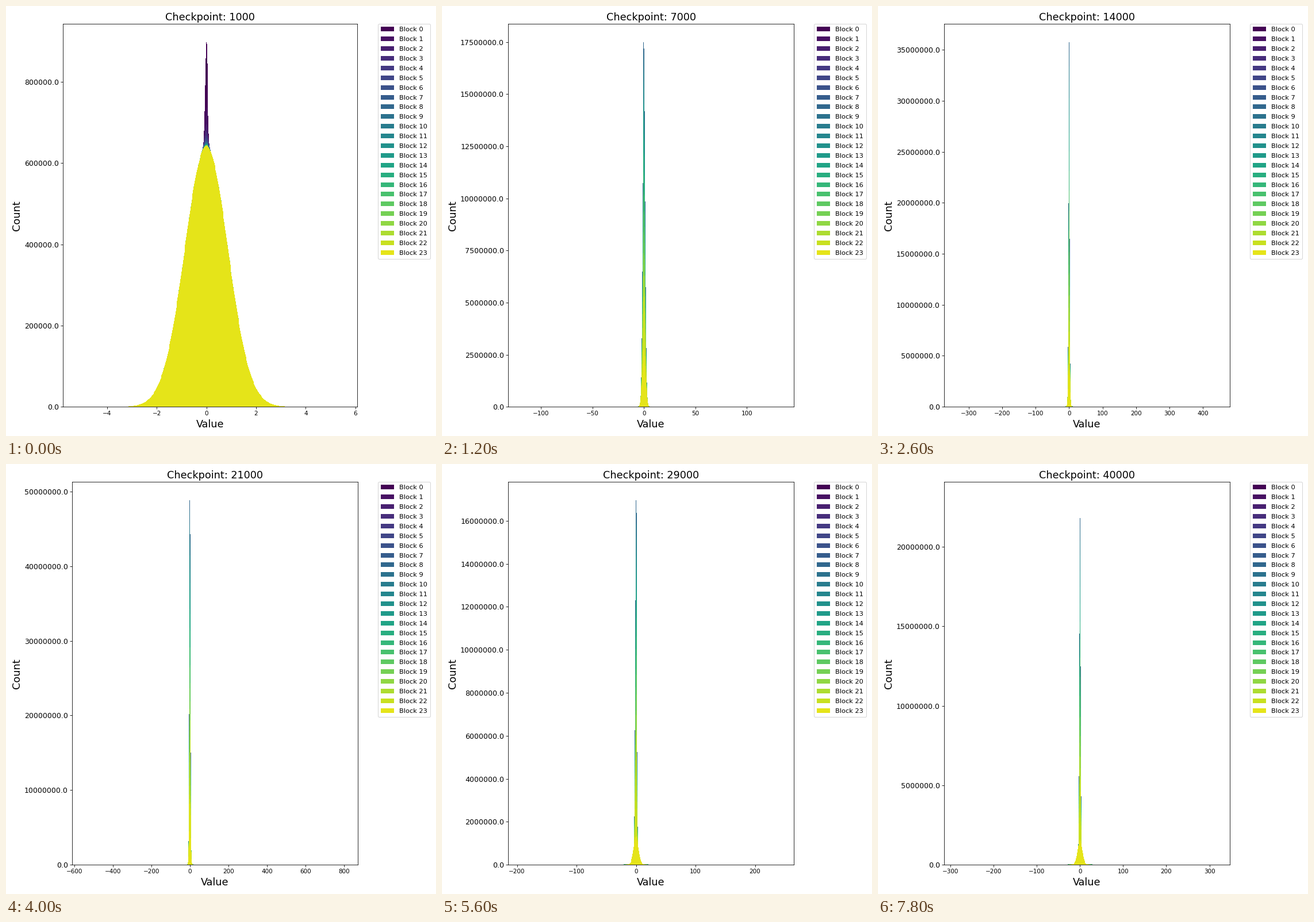
A matplotlib script for the animation above (8000 ms loop, 748 by 748 pixels).

```python
import numpy as np
import matplotlib.pyplot as plt
from matplotlib.animation import FuncAnimation
from matplotlib.patches import Patch

SIZE = 748
FRAMES, INTERVAL = 40, 200
BLOCKS, BINS = 24, 500
SETTLE = 6                    # steps until the early shape is gone
BOTTOM, TOP = 697.2, 31.2     # axes edges in pixels from the top

# key points of the axis range and the tallest bar
STEPS = [0, 6, 13, 20, 28, 33, 39]
X_MIN = [5.77, 131.8, 373.6, 611.3, 214.8, 230.2, 314.5]
X_MAX = [6.08, 145.5, 480.7, 871.3, 265.1, 266.3, 347.1]
TALLEST = [0.898e6, 17.495e6, 35.75e6, 48.83e6, 16.96e6, 17.52e6, 22.94e6]

block = np.arange(BLOCKS)
COLORS = plt.cm.viridis(block / BLOCKS)
HEIGHTS = 1 - 0.7 * np.clip((block - 8) / 14, 0, 1) ** 1.2


def between(i, values):
    """Value at step i: geometric growth at first, then linear."""
    if i < SETTLE:
        return np.exp(np.interp(i, STEPS, np.log(values)))
    return np.interp(i, STEPS, values)


def bell(x, sd):
    return np.exp(-0.5 * (x / sd) ** 2)


def histograms(i):
    left, right, top = (between(i, v) for v in (X_MIN, X_MAX, TALLEST))
    span = left + right
    width = span / 1.1 / BINS
    first = -np.round((left - span * 0.05 / 1.1) / width)
    edges = (first + 0.1 + np.arange(BINS + 1)) * width
    x = edges[:-1] + width / 2

    # spread follows the range; the last block keeps widening
    sd = 0.86 + 0.00125 * span
    last_sd = sd if i == 0 else 0.89 + 0.11 * i
    heights = HEIGHTS.copy()
    heights[-1] = 0.2 * sd / last_sd
    early = max(0, 1 - i / SETTLE)
    heights = early + (1 - early) * heights
    spreads = sd * heights ** -0.15
    spreads[-1] = last_sd

    # faint tails, shorter for the last blocks
    reach = (1 + 0.85 * i) * (1 - 0.4 * np.clip((block - 16) / 7, 0, 1))
    # narrow spike at zero, strongest in the first block
    spikes = 0.41 * early ** 3 / (1 + block) ** 1.4
    spike_sds = 0.05 * (1 + block) ** 0.3

    counts = np.array([
        h * bell(x, s) + k * bell(x, ks) + 0.0022 * np.exp(-(x / r) ** 2)
        for h, s, k, ks, r in zip(heights, spreads, spikes, spike_sds, reach)])
    return edges, counts * top / counts.max(), (-left, right), top * 1.05


fig = plt.figure(figsize=(10, 10), dpi=SIZE / 10)
ax = fig.add_axes([0.15, 0.07, 0.66, 0.89])
ax.set_xlabel("Value", fontsize=17)
ax.set_ylabel("Count", fontsize=17)
ax.tick_params(axis="y", labelsize=12)
ax.yaxis.set_major_formatter(lambda v, pos: f"{v:.1f}")
title = ax.set_title("", fontsize=17)

bars = [ax.stairs(np.zeros(BINS), np.arange(BINS + 1), fill=True,
                  color=c, antialiased=False) for c in COLORS]
ax.legend(handles=[Patch(color=c, linewidth=0, label=f"Block {b}")
                   for b, c in enumerate(COLORS)],
          loc="upper left", bbox_to_anchor=(1.07, 1), borderaxespad=0,
          borderpad=0.45, labelspacing=0.603, fontsize=11)


def fit_axes(ymax):
    """Leave room on the left for the widest count label."""
    ticks = ax.get_yticks()
    digits = len(str(int(ticks[ticks <= ymax].max())))
    left = 115.2 - 7.93 * (8 - digits)
    right = 606.8 + 0.0443 * left
    ax.set_position([left / SIZE, 1 - BOTTOM / SIZE,
                     (right - left) / SIZE, (BOTTOM - TOP) / SIZE])


def draw(i):
    edges, counts, xlim, ymax = histograms(i)
    for bar, c in zip(bars, counts):
        bar.set_data(values=c, edges=edges)
    ax.set_xlim(xlim)
    ax.set_ylim(0, ymax)
    fit_axes(ymax)
    title.set_text(f"Checkpoint: {(i + 1) * 1000}")
    return bars


anim = FuncAnimation(fig, draw, frames=FRAMES, interval=INTERVAL,
                     init_func=lambda: draw(0), repeat=True, repeat_delay=0)
plt.show()
```
